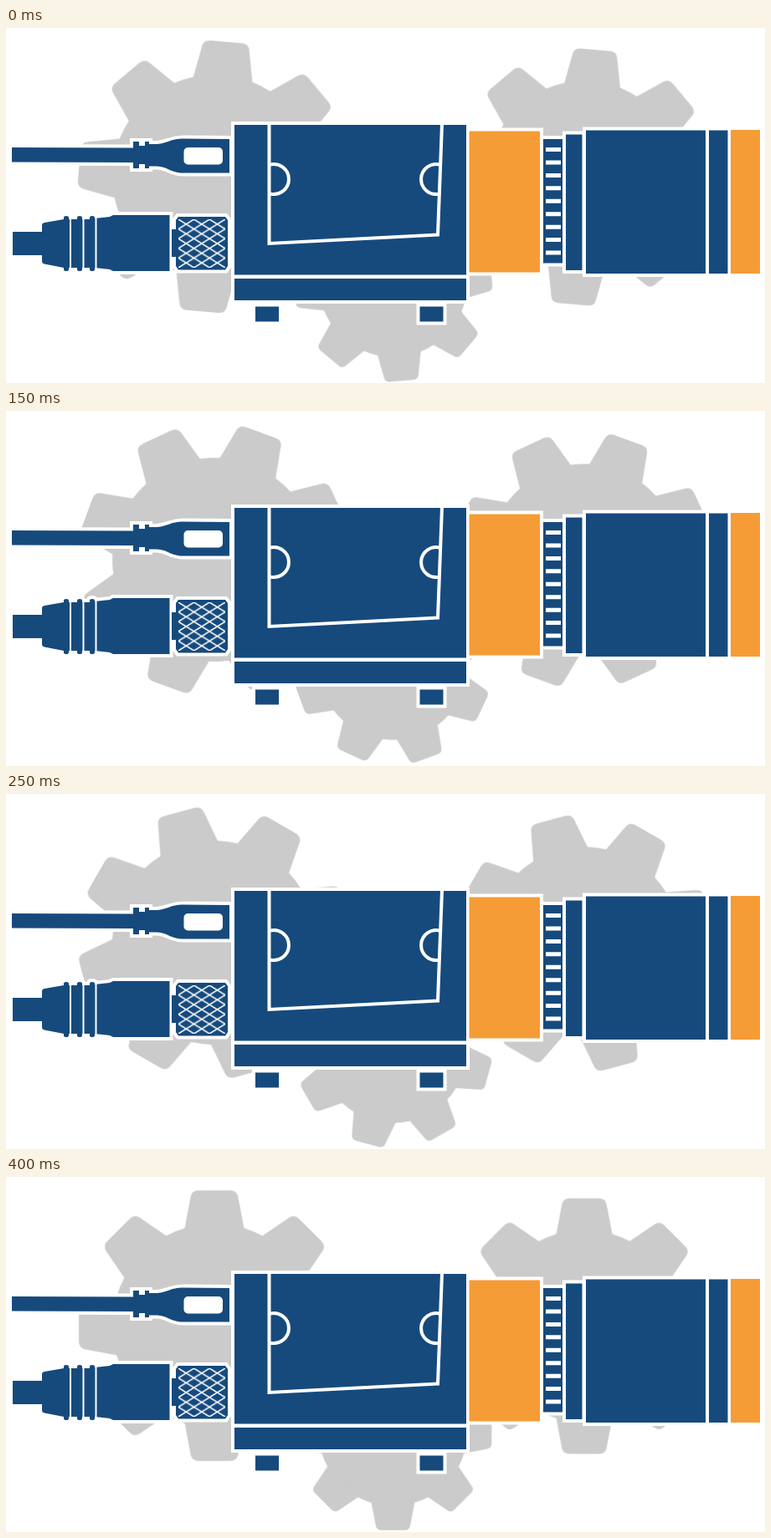
Animation, 907 px wide and 425 px high, one loop 450 ms. Source, as an HTML page without scripts:

```html
<!DOCTYPE html>
<html lang="en">
<head>
<meta charset="utf-8">
<title>Camera with turning gears</title>
<style>
  html, body { margin: 0; width: 100%; height: 100%; overflow: hidden; background: #fff; }
  svg { display: block; width: 100%; height: 100%; }
  .gear { fill: #cbcbcb; }
  .blue { fill: #164a7d; }
  .orange { fill: #f59c36; }
  .line { fill: none; stroke: #fff; stroke-width: 4; }
  .spin { animation: turn .45s steps(9) infinite; }
  .back { animation-name: turn-back; }
  @keyframes turn { from { transform: rotate(5deg); } to { transform: rotate(50deg); } }
  @keyframes turn-back { from { transform: rotate(-5deg); } to { transform: rotate(-50deg); } }
</style>
</head>
<body>
<svg viewBox="0 0 907 425" xmlns="http://www.w3.org/2000/svg">
  <defs>
    <path id="tooth" d="M-36-114L-28.4-154Q-27-162-19-162H19Q27-162 28.4-154L36-114Z"/>
    <g id="pair">
      <use href="#tooth"/>
      <use href="#tooth" transform="rotate(180)"/>
    </g>
    <g id="gear">
      <circle r="122"/>
      <use href="#pair"/>
      <use href="#pair" transform="rotate(45)"/>
      <use href="#pair" transform="rotate(90)"/>
      <use href="#pair" transform="rotate(135)"/>
    </g>
    <pattern id="knurl" x="206" y="229" width="18.6" height="11.6" patternUnits="userSpaceOnUse">
      <path d="M-1.86-1.16L20.46 12.76M-1.86 12.76L20.46-1.16" stroke="#fff" stroke-width="1.5"/>
    </pattern>

    <!-- solid parts, drawn once as a white halo and once plain -->
    <g id="parts">
      <g class="blue">
        <path d="M7 143L152 143.5V136H159V141H166V136H171V139H180C194 138 196 132.5 212 132.5L267 133V173.500H212C196 173.500 194 166 180 165.500H171V168H166V163H159V168H152V161L7 160.500Z"/>
        <path d="M8 244H43V236Q43 233.500 46 233L69 229V227Q69 225 72 225T75 227V229H85V227Q85 225 88 225T91 227V229H100V227Q100 225 103 225T106 227V228L124 226L128 224H195.500V291H128L124 289L106 287V289Q106 291 103 291T100 289V287H91V289Q91 291 88 291T85 289V287H75V289Q75 291 72 291T69 289V287L46 282.500Q43 282 43 279V272H8Z"/>
        <rect x="198" y="241" width="7" height="33"/>
        <path d="M206 226H262L265 230V285L262 289.500H206L203 285V230Z"/>
        <rect x="273" y="116" width="277" height="179.500"/>
        <rect x="273" y="300" width="277" height="26"/>
        <rect x="298" y="333.500" width="28" height="18"/>
        <rect x="494.500" y="333.500" width="28" height="18"/>
        <rect x="642" y="133" width="23" height="148.500"/>
        <rect x="669" y="127.500" width="19.500" height="162.500"/>
        <rect x="693" y="122.500" width="143" height="171.500"/>
        <rect x="840" y="122.500" width="22.500" height="171.500"/>
      </g>
      <g class="orange">
        <rect x="553.500" y="123.500" width="84.500" height="169"/>
        <rect x="866" y="122" width="35" height="172"/>
      </g>
    </g>
  </defs>

  <rect width="907" height="425" fill="#fff"/>

  <g class="gear">
    <g transform="translate(249 178)"><use class="spin" href="#gear"/></g>
    <g transform="translate(691 178.500) scale(.944)"><use class="spin" href="#gear"/></g>
    <g transform="translate(462.500 305) scale(.728)"><use class="spin back" href="#gear"/></g>
  </g>

  <use href="#parts" stroke="#fff" stroke-width="8"/>
  <use href="#parts"/>

  <!-- plugs -->
  <rect x="212.500" y="143" width="46.500" height="20.500" rx="5" fill="#fff"/>
  <path class="line" style="stroke-width:2" d="M77 226V290M92.500 226V290M107.500 226V290"/>
  <rect x="206" y="229" width="56" height="58" fill="url(#knurl)"/>

  <!-- housing -->
  <path class="line" d="M314.500 115V258L516 247.500L521 115"/>
  <path class="line" d="M315 163.700A18 18 0 1 1 315 198.300M519 163.700A18 18 0 1 0 517.500 198.700"/>

  <!-- focus ring -->
  <path class="line" stroke-dasharray="5 10.440" style="stroke-width:18" d="M654 143V272"/>
</svg>
</body>
</html>
```
